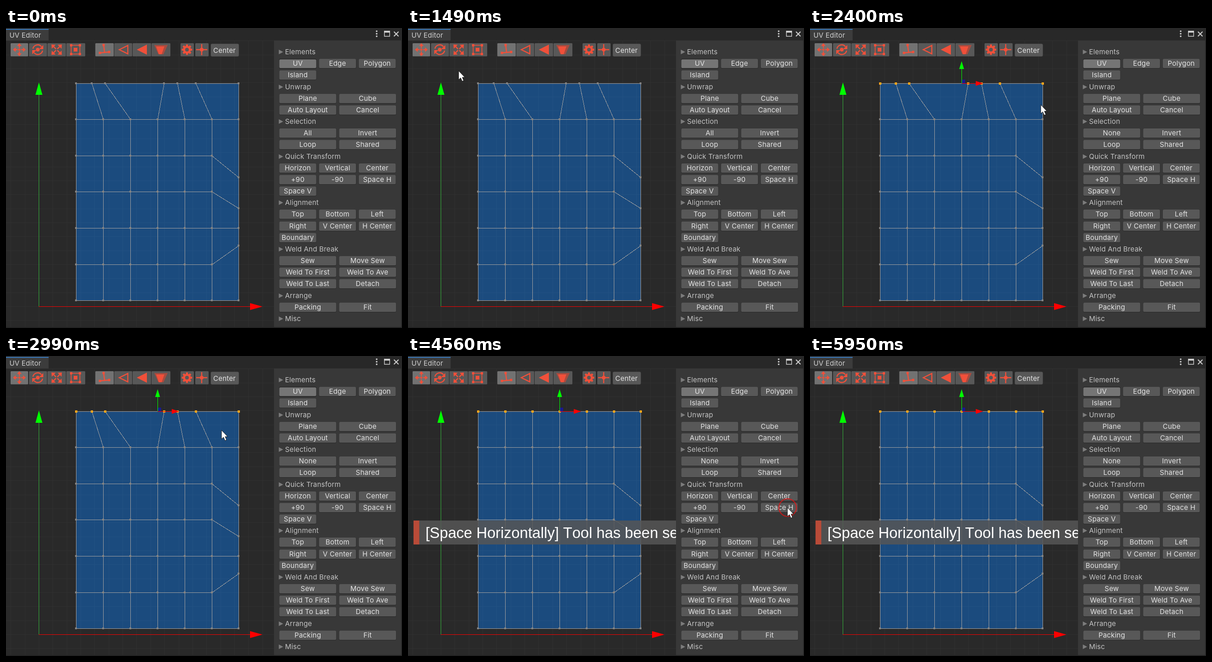
Animation of 860 by 651 pixels, one loop 6110 ms. Source, as an HTML page:

```html
<!DOCTYPE html>
<html lang="en">
<head>
<meta charset="utf-8">
<title>UV Editor</title>
<style>
html, body { margin: 0; width: 100%; height: 100%; overflow: hidden; background: #282828; }
svg { display: block; width: 860px; height: 651px; }
text { font: 15px Inter, "Open Sans", sans-serif; letter-spacing: .2px; fill: #e4e4e4; white-space: pre; }
.mid { text-anchor: middle; }
.head { fill: #c4c4c4; }
.banner { font: 32.6px "Liberation Sans", Arial, sans-serif; letter-spacing: 0; font-kerning: none; fill: #fff; }
.tipTitle { font-weight: 700; fill: #e84b37; }
.crisp { shape-rendering: crispEdges; }
.icon { fill: none; stroke: #f0503a; stroke-width: 2.4; }
.solid { fill: #f0503a; stroke: none; }
</style>
</head>
<body>
<svg id="stage" viewBox="0 0 860 651"></svg>
<script>
const LOOP = 6110;
const PRESS_1 = 1515, DRAG_END = 2190, PRESS_2 = 4140, RELEASE_2 = 4350;
const TIP_ON = 4770, TIP_OFF = 5120;
const stage = document.getElementById('stage');

const rect = (x, y, w, h, fill, extra = '') =>
  `<rect x="${x}" y="${y}" width="${w}" height="${h}" fill="${fill}" ${extra}/>`;
const path = (d, attrs) => `<path d="${d}" ${attrs}/>`;
const text = (x, y, s, attrs = '') => `<text x="${x}" y="${y}" ${attrs}>${s}</text>`;
const range = n => Array.from({ length: n }, (_, i) => i);

// Canvas: grid, axes and mesh
const COLS = range(7).map(i => Math.floor(152.2 + 58.96 * i));
const ROWS = range(7).map(i => Math.floor(120 + 78.6 * i));
const LOOSE_TOP = [152, 186, 215, 343, 372, 412, COLS[6]];
const RIGHT = [ROWS[0], ROWS[1], 324, 391, ROWS[4], 472, ROWS[6]];

function grid() {
  const step = 30.35;
  let d = '';
  for (let x = 71.5 - 2 * step; x < 582; x += step) d += `M${x} 27V651`;
  for (let y = 604.5 - 19 * step; y < 651; y += step) d += `M0 ${y}H582`;
  return path(d, 'class="crisp" fill="none" stroke="#fff" stroke-opacity=".03"');
}

function axes() {
  return path('M71.5 145V604', 'class="crisp" stroke="#35b43c"') +
    path('M71.5 118L79 145H64Z', 'fill="#0f0"') +
    path('M71 604.5H531', 'class="crisp" stroke="#f00"') +
    path('M557 604.5L530 597V612Z', 'fill="#f00"');
}

function mesh(spaced, selected) {
  const at = (r, c) => [
    r === 0 ? (spaced ? COLS : LOOSE_TOP)[c] : COLS[c],
    c === 6 ? RIGHT[r] : ROWS[r]
  ];
  let lines = '', dots = '';
  for (const r of range(7)) for (const c of range(7)) {
    const [x, y] = at(r, c);
    const seg = p => { lines += `M${x + .5} ${y + .5}L${p[0] + .5} ${p[1] + .5}`; };
    if (c < 6) seg(at(r, c + 1));
    if (r < 6) seg(at(r + 1, c));
    const on = selected && r === 0, s = on ? 5 : 4;
    dots += rect(x - 2, y - 2, s, s, on ? '#ffa61c' : '#838383');
  }
  return `<g class="crisp">${path(lines, 'fill="none" stroke="#a0a0a0"')}${dots}</g>`;
}

const gizmo = rect(329, 112, 8, 8, '#1414b4', 'opacity=".75"') +
  path('M329.5 120V88', 'class="crisp" stroke="#0f0"') +
  path('M329.3 72L334.5 89H324Z', 'fill="#0f0"') +
  path('M329 120.5H362', 'class="crisp" stroke="#f00"') +
  path('M376 120.3L360 115V125.5Z', 'fill="#f00"');

// Toolbar
function icons() {
  const spin = (x, y, n, body, start = 0) => range(n).map(i =>
    `<g transform="translate(${x} ${y}) rotate(${start + i * 360 / n})">${body}</g>`).join('');
  const stroke = d => path(d, 'class="icon"');
  const solid = d => path(d, 'class="solid"');
  const box = (x, y, s) => rect(x - s / 2, y - s / 2, s, s, '#f0503a');
  const disc = (x, y, r) => `<circle cx="${x}" cy="${y}" r="${r}" class="solid"/>`;
  return spin(29, 47, 4, stroke('M4 0H9') + solid('M14 0L8 -5V5Z')) + disc(29, 47, 2.4) +
    spin(69, 47, 2, stroke('M-10.5 -2A10.5 10.5 0 0 1 8 -6.5') + solid('M12 -10V-1H3Z')) +
    disc(69, 47, 4) +
    spin(110, 47, 4, stroke('M2 0H11') + solid('M16 0L9 -6V6Z'), 45) +
    path('M141.5 37.5H160.5V56.5H141.5Z', 'class="icon" style="stroke-width:1.6"') + box(151, 47, 8) +
    [[141.5, 37.5], [160.5, 37.5], [141.5, 56.5], [160.5, 56.5]].map(p => box(...p, 5)).join('') +
    stroke('M212 37L214 52M204 54L224 52') +
    [[212, 37], [204, 54], [224, 52]].map(p => box(...p, 5)).join('') +
    stroke('M246 47L264.5 38V56Z') +
    solid('M284 47L306 36V58Z') +
    path('M322 37H351L342 57H331Z', 'fill="#a84b3f"') +
    solid('M326 40H344L338 57H332Z') +
    `<circle cx="393" cy="47" r="6.3" class="icon" style="stroke-width:4.6"/>` +
    spin(393, 47, 8, rect(-2.2, -11.3, 4.4, 4, '#f0503a')) +
    stroke('M425 35V59M413 47H437') + disc(425, 47, 4);
}

function toolbar() {
  const tools = [[10, 38], [50, 39], [90, 40], [131, 41], [194, 40], [235, 39], [275, 40], [316, 41], [379, 29], [411, 29]];
  return tools.map(([x, w], i) =>
    rect(x, 33, w, 28.5, i === 0 || i === 4 ? '#727272' : '#585858', 'rx="1.5"')).join('') +
    icons() + rect(444.5, 34, 61.5, 28, '#585858', 'rx="3" stroke="#303030" stroke-width=".8"') +
    text(474.5, 53.7, 'Center', 'class="mid"');
}

// Side panel: a line with ">" is a heading, others are rows of buttons
const PANEL = `>Elements
UV|Edge|Polygon
Island||
>Unwrap
Plane|Cube
Auto Layout|Cancel
>Selection
All|Invert
Loop|Shared
>Quick Transform
Horizon|Vertical|Center
+90|-90|Space H
Space V||
>Alignment
Top|Bottom|Left
Right|V Center|H Center
Boundary||
>Weld And Break
Sew|Move Sew
Weld To First|Weld To Ave
Weld To Last|Detach
>Arrange
Packing|Fit
>Misc`.split('\n');

function button(x, y, w, label, lit) {
  return rect(x, y - 10, w, 21, lit ? '#1c1c1c' : '#282828', 'rx="3"') +
    rect(x + .5, y - (lit ? 9 : 10), w - 1, lit ? 19 : 20, lit ? '#757575' : '#585858', 'rx="2.5"') +
    text(x + w / 2, y + 5, label, 'class="mid"');
}

function panel(selected, pressed) {
  let out = rect(582, 27, 278, 624, '#383838') + rect(858.5, 27, 1.5, 624, '#222') + rect(0, 649, 860, 2, '#222');
  PANEL.forEach((row, i) => {
    const y = Math.round(52 + i * 25.17);
    if (row[0] === '>') {
      out += path(`M592.5 ${y - 5}L602 ${y}L592.5 ${y + 5}Z`, 'fill="#7c7c7c"') +
        text(606, y + 5, row.slice(1), 'class="head"');
      return;
    }
    const cells = row.split('|'), three = cells.length === 3;
    cells.forEach((label, c) => {
      if (!label) return;
      const lit = label === 'UV' || (label === 'Space H' && pressed);
      const shown = label === 'All' && selected ? 'None' : label;
      out += button(593 + c * (three ? 86.3 : 130), y, three ? 81.3 : 124.7, shown, lit);
    });
  });
  return out;
}

const titleBar = rect(0, 0, 860, 27, '#282828') + rect(0, 2, 92.5, 25, '#3c3c3c') +
  rect(0, 2, 92.5, 2, '#3a79bb') + text(7.5, 20.8, 'UV Editor', 'style="fill:#d2d2d2"') +
  [7, 12.5, 18].map(y => `<circle cx="805" cy="${y}" r="1.8" fill="#d0d0d0"/>`).join('') +
  path('M821.8 7V18H833.2V7Z', 'fill="none" stroke="#d0d0d0" stroke-width="1.4"') +
  rect(821, 6, 13, 4, '#d0d0d0') +
  path('M842.5 8L852.5 18M852.5 8L842.5 18', 'stroke="#d0d0d0" stroke-width="2"');

const banner = rect(24, 357, 558, 52, '#565656', 'opacity=".85"') + rect(12, 357, 12.5, 52, '#b94b38') +
  text(38, 394.5, '[Space Horizontally] Tool has been selected', 'class="banner"');

const tooltip = rect(483.5, 351.5, 376, 85, '#383838', 'stroke="#1c1c1c" stroke-width="1.5"') +
  text(488.5, 372.7, 'Space Horizontally Tool', 'class="tipTitle"') +
  text(488.5, 409.6, 'Spaces the selected vertices or edges evenly', 'class="head"') +
  text(488.5, 428, 'horizontally.', 'class="head"');

// Pointer path: time, x, y
const TRACK = [
  [130, 716, -10], [270, 560, 60], [410, 330, 125], [550, 190, 134], [690, 150, 99], [1180, 110, 93],
  [1520, 110, 93], [1590, 149, 109], [1770, 380, 140], [1980, 514, 154], [2190, 517, 158],
  [2680, 480, 178], [2820, 446, 172], [2990, 468, 161], [3130, 500, 220], [3340, 551, 333],
  [3480, 640, 347], [3690, 800, 345], [3760, 834, 335], [3900, 824, 329], [4770, 824, 329],
  [4980, 852.5, 141], [5120, 866, -25]
];

function pointer(t) {
  const i = TRACK.findIndex(k => k[0] > t);
  if (i < 1) return null;
  const [a, b] = [TRACK[i - 1], TRACK[i]];
  const f = (t - a[0]) / (b[0] - a[0]);
  return [a[1] + (b[1] - a[1]) * f, a[2] + (b[2] - a[2]) * f];
}

function ripple(x, y, age) {
  if (age < 0 || age > 800) return '';
  return `<circle cx="${x}" cy="${y}" r="${1 + age * .043}" fill="none" stroke="#e81212" ` +
    `stroke-width="${3.4 - age * .0025}" opacity="${1 - (age / 800) ** 2}"/>`;
}

const STEP_STARTS = [0, 130, 1490, 2990, 4140];
function stepped(t) {
  const s = STEP_STARTS.filter(v => v <= t).pop();
  return s + Math.floor((t - s) / 70) * 70;
}

stage.innerHTML = rect(0, 0, 860, 651, '#292929') + rect(152, 120, 354, 472, '#1b4b7e') + grid() + axes() +
  '<g id="view"></g>' + toolbar() + titleBar + '<g id="side"></g><g id="top"></g>';
const layers = ['view', 'side', 'top'].map(id => document.getElementById(id));
const cache = [];
function put(i, html) {
  if (cache[i] !== html) layers[i].innerHTML = cache[i] = html;
}

function draw(time) {
  const t = stepped(time);
  const selected = t >= DRAG_END, spaced = t >= RELEASE_2;
  const p = pointer(t);
  const dragging = t > PRESS_1 && t < DRAG_END && p && p[0] > 152;

  put(0, mesh(spaced, selected) + (selected ? gizmo : '') +
    (dragging ? rect(149, 109, p[0] - 152, p[1] - 110, '#fff', 'opacity=".14"') : '') +
    (spaced ? banner : ''));
  put(1, panel(selected, t >= PRESS_2 && t < RELEASE_2));
  put(2, ripple(109.5, 93.5, t - PRESS_1) + ripple(824.5, 329, t - PRESS_2) +
    (t >= TIP_ON && t < TIP_OFF ? tooltip : '') +
    (p ? path('M0 0V19.2L4.4 15.2L7.6 22.6L11 21.2L7.9 14H13.4Z',
      `transform="translate(${p[0]} ${p[1]})" fill="#fff" stroke="#111" stroke-width=".9"`) : ''));
}

const begin = performance.now();
function tick() {
  draw((performance.now() - begin) % LOOP);
  requestAnimationFrame(tick);
}
tick();
</script>
</body>
</html>
```
